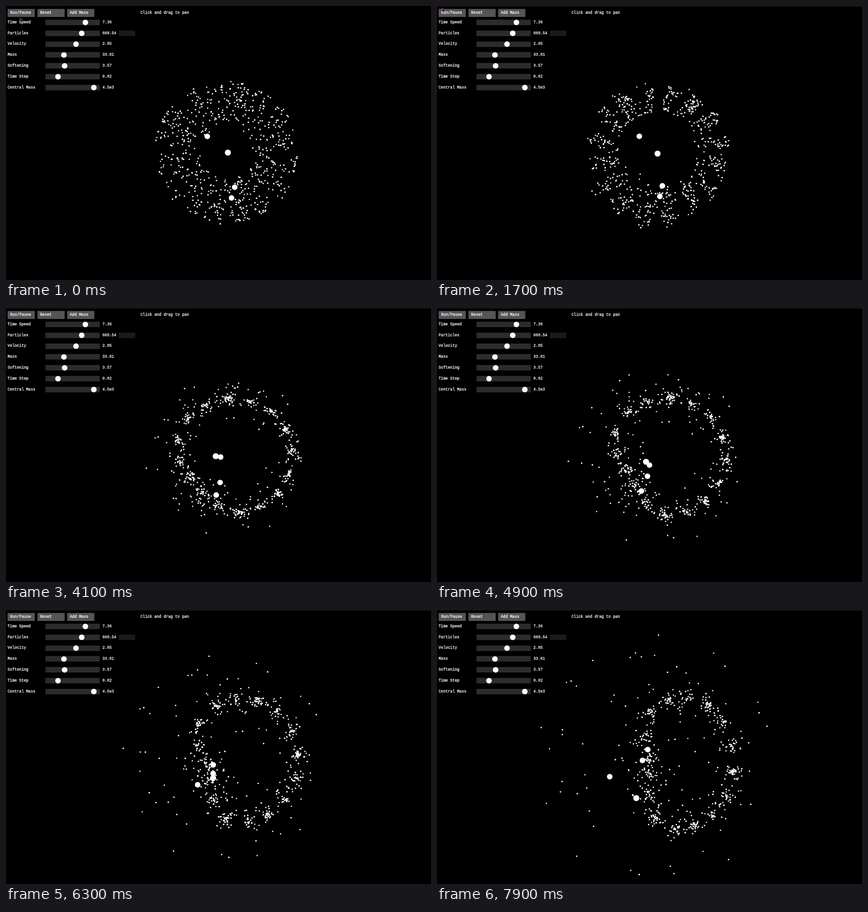
Animation, 931 px wide and 601 px high, one loop 8 s. Source, as an HTML page with a canvas:

```html
<!DOCTYPE html>
<html lang="en">
<head>
<meta charset="utf-8">
<title>Gravity sandbox</title>
<style>
  html, body { margin: 0; width: 931px; height: 601px; overflow: hidden; background: #000; }
  canvas { display: block; }
</style>
</head>
<body>
<canvas id="stage" width="931" height="601"></canvas>
<script>
const ctx = document.getElementById('stage').getContext('2d');
const LOOP = 8000, STEP = 100;
const COUNT = 630, CLUMPS = 16, INNER = 55, OUTER = 157, MIDDLE = 106;
const GAP = Math.PI * 2 / CLUMPS, PHASE = 0.19;

// Heavy bodies: one point every two seconds
const BODIES = [
  { r: 6.6, x: [486, 481.5, 460, 456, 436], y: [321.5, 324, 324, 361, 414] },
  { r: 6.1, x: [441, 445, 470, 455, 450], y: [286, 288, 325, 360, 329] },
  { r: 6.1, x: [501, 491.5, 470, 454, 462], y: [397.5, 393.5, 384, 346, 305] },
  { r: 6.1, x: [494, 486, 462, 427, 377], y: [421, 417, 411, 387, 365] }
];

const SLIDERS = [
  ['Time Speed', 173.5, '7.36'], ['Particles', 165.5, '668.54'], ['Velocity', 153, '2.85'],
  ['Mass', 126.5, '33.81'], ['Softening', 128, '3.57'], ['Time Step', 113.5, '0.02'],
  ['Central Mass', 192, '4.5e3']
];

let seed = 20;
function rand() {
  seed = (seed * 1664525 + 1013904223) % 4294967296;
  return seed / 4294967296;
}

function ease(u) {
  u = Math.min(1, Math.max(0, u));
  return u * u * (3 - 2 * u);
}

// Catmull-Rom curve through evenly spaced values
function spline(v, s) {
  const i = Math.min(Math.floor(s), v.length - 2), u = s - i;
  const b = v[i], c = v[i + 1], a = v[i - 1] ?? b, d = v[i + 2] ?? c;
  return b + u / 2 * (c - a + u * (2 * a - 5 * b + 4 * c - d + u * (3 * (b - c) + d - a)));
}

const particles = Array.from({ length: COUNT }, () => {
  const angle = rand() * Math.PI * 2;
  const radius = Math.sqrt(INNER ** 2 + rand() * (OUTER ** 2 - INNER ** 2));
  const clump = Math.round((angle - PHASE) / GAP);
  const home = PHASE + clump * GAP;
  return {
    angle, radius, home,
    side: (angle - home) * MIDDLE,
    rise: radius - MIDDLE,
    // clumps that start below the centre get torn apart
    loose: Math.max(0, Math.sin(home)) ** 4,
    stray: rand() < 0.15,
    size: 1.4 + rand() * 0.4,
    keep: 0.1 + 0.7 * rand() ** 2,
    spin: 0.2 + rand() * 0.7,
    drift: rand() * 44 - 14
  };
});

// The ring turns, drifts to the right and becomes a tall oval
function ringAt(t) {
  const shift = (t / 7.9) ** 2;
  return {
    x: 483 + 53 * shift,
    y: 321 + 14 * shift,
    rx: MIDDLE + 10.5 * t - 1.2 * t * t,
    ry: MIDDLE + 5 * t,
    turn: 0.24 * t - 0.006 * t * t
  };
}

function strayAt(p, t) {
  const lift = Math.max(0, 92 - p.radius) * ease(t / 2);
  const r = p.radius + lift + p.drift * Math.max(0, t - 2.7);
  const a = p.angle + 0.24 * t * 110 / (p.radius + 30 + 5 * t);
  return { x: 483 + r * Math.cos(a), y: 321 + r * Math.sin(a) };
}

function clumpedAt(p, t, ring) {
  const pull = 1 - 0.4 * p.loose * ease((t - 1.5) / 5);
  const scatter = 1 + 1.3 * p.loose * ease(t / 4) + 0.08 * Math.max(0, t - 3);
  const size = scatter * (1 + (p.keep - 1) * ease(t / 3.3));
  const whirl = p.spin * Math.max(0, t - 1.3);
  const cw = Math.cos(whirl), sw = Math.sin(whirl);
  const side = size * (p.side * cw + p.rise * sw);
  const rise = size * (p.rise * cw - p.side * sw);
  const c = Math.cos(p.home + ring.turn), s = Math.sin(p.home + ring.turn);
  return {
    x: ring.x + (ring.rx * pull + rise) * c - side * s,
    y: ring.y + (ring.ry * pull + rise) * s + side * c
  };
}

function disc(x, y, r) {
  ctx.beginPath();
  ctx.arc(x, y, r, 0, Math.PI * 2);
  ctx.fill();
}

function box(color, x, y, w, h) {
  ctx.fillStyle = color;
  ctx.fillRect(x, y, w, h);
}

function label(text, x, y) {
  ctx.fillStyle = ctx.strokeStyle = '#fff';
  ctx.lineWidth = 0.3;
  ctx.fillText(text, x, y);
  ctx.strokeText(text, x, y);
}

function drawPanel() {
  ctx.font = '8.45px "Liberation Mono", "Courier New", monospace';
  [['Run/Pause', 3.5], ['Reset', 69], ['Add Mass', 134]].forEach(([text, x]) => {
    box('#555', x, 6.5, 59.5, 17.5);
    label(text, x + 5.8, 17);
  });
  label('Click and drag to pan', 294.5, 17);
  box('#1a1a1a', 247, 54, 36, 12);
  SLIDERS.forEach(([name, knob, value], i) => {
    const y = i * 23.8;
    box('#2c2c2c', 86.5, Math.round(30 + y), 119, 12);
    label(name, 3.5, 37.7 + y);
    label(value, 211.3, 37.7 + y);
    disc(knob + 0.4, 36.1 + y, 6.1);
  });
}

function drawCursor(t) {
  if (t >= 1.9) return;
  const u = ease(t / 0.9);
  ctx.save();
  ctx.translate(31 - 20 * u, 26.5 - 22 * u);
  ctx.beginPath();
  ctx.moveTo(0, 0);
  ctx.lineTo(7, 7);
  ctx.lineTo(3.5, 7);
  ctx.lineTo(0.5, 9.5);
  ctx.closePath();
  ctx.fillStyle = '#000';
  ctx.fill();
  ctx.strokeStyle = '#c86ac8';
  ctx.lineWidth = 1;
  ctx.stroke();
  ctx.restore();
}

function draw(t) {
  box('#000', 0, 0, 931, 601);
  if (t >= 0.5) box('#32141a', 0, 0, 931, 1);
  drawPanel();
  ctx.fillStyle = '#fff';
  const ring = ringAt(t);
  for (const p of particles) {
    const { x, y } = p.stray ? strayAt(p, t) : clumpedAt(p, t, ring);
    disc(x, y, p.size);
  }
  for (const b of BODIES) disc(spline(b.x, t / 2), spline(b.y, t / 2), b.r);
  drawCursor(t);
}

const begin = performance.now();
function tick() {
  const ms = (performance.now() - begin) % LOOP;
  draw(Math.floor(ms / STEP) * STEP / 1000);
  requestAnimationFrame(tick);
}
tick();
</script>
</body>
</html>
```
